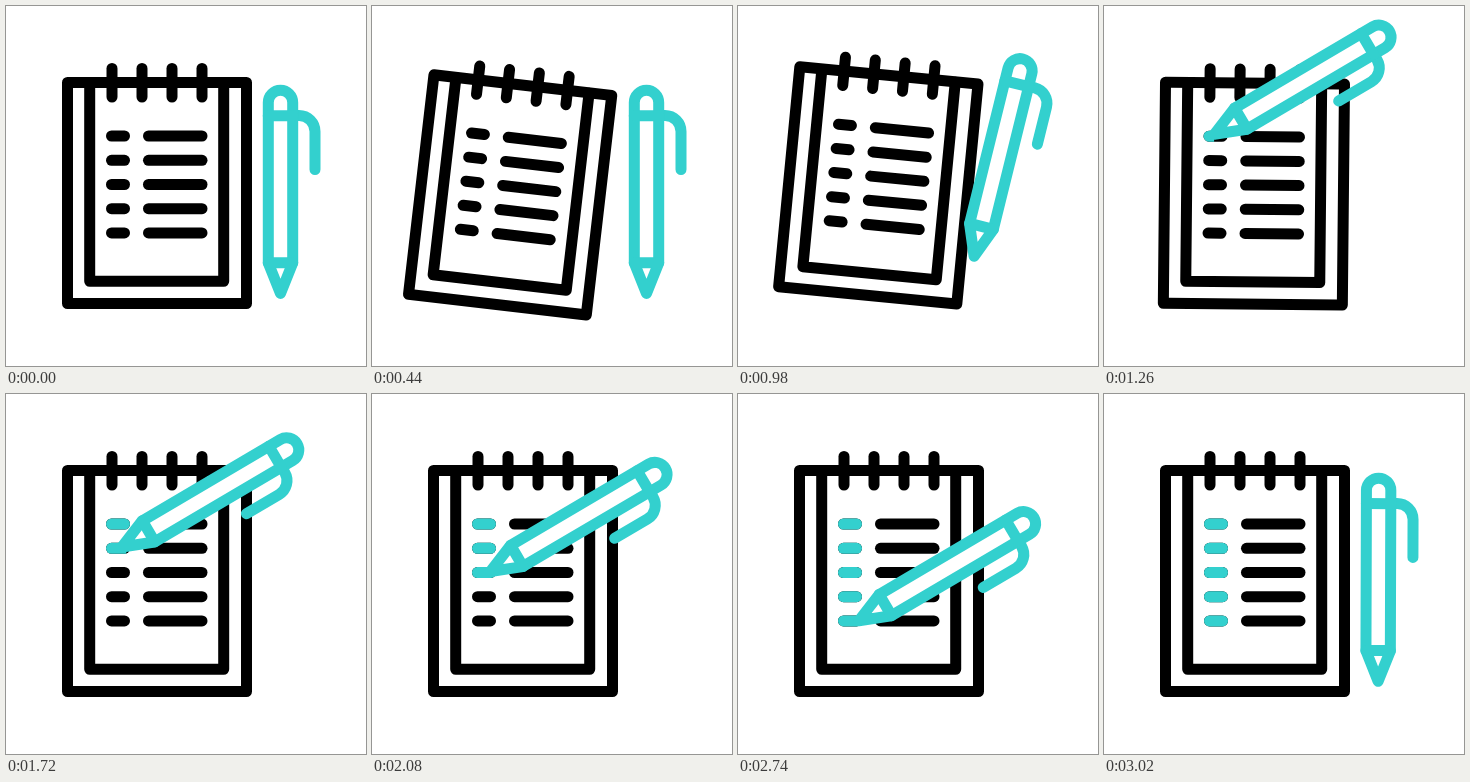
Write an HTML page with a canvas that moves like this. It is 360 by 360 pixels and loops after 3040 ms.

```html
<!DOCTYPE html>
<html lang="en">
<head>
<meta charset="utf-8">
<title>Notepad and pen</title>
<style>
  html, body { margin: 0; width: 100%; height: 100%; overflow: hidden; background: #fff; }
  canvas { display: block; width: 360px; height: 360px; }
</style>
</head>
<body>
<canvas id="stage" width="360" height="360"></canvas>
<script>
const ctx = document.getElementById('stage').getContext('2d');
const LOOP = 3040;
const TEAL = '#33d0ce';
const ROWS = [130, 154.3, 178.5, 202.7, 226.9];
const RINGS = [106, 136, 166, 196];

// Pad poses: time, tilt in degrees, vertical shift
const LOW = [7.3, 4.8], HIGH = [5.5, -10];
const PAD = [[0, 0, 0], [190, ...LOW]];
for (let i = 0; i < 6; i++) PAD.push([349 + i * 159, ...(i % 2 ? LOW : HIGH)]);
PAD.push([1285, 0, 0]);

// Pen timing and places of its tip
const REST = { x: 274.5, y: 288, a: 0 };
const TILT = 59.5;
const REACH = 858, WRITE = 1250, ROW_TIME = 310, STROKE = 250;
const LEAVE = WRITE + 4 * ROW_TIME + STROKE, HOME = 3030;

const clamp = v => Math.max(0, Math.min(1, v));
const ease = u => u * u * (3 - 2 * u);
const mix = (a, b, u) => a + (b - a) * u;
const part = (t, from, to) => clamp((t - from) / (to - from));
const mixPose = (p, q, u) => ({ x: mix(p.x, q.x, u), y: mix(p.y, q.y, u), a: mix(p.a, q.a, u) });

function padPose(t) {
  for (let i = 1; i < PAD.length; i++) {
    const [t0, a0, y0] = PAD[i - 1], [t1, a1, y1] = PAD[i];
    if (t < t1) {
      const u = ease(part(t, t0, t1));
      return { a: mix(a0, a1, u), y: mix(y0, y1, u) };
    }
  }
  return { a: 0, y: 0 };
}

const strokeProgress = (t, row) => {
  const start = WRITE + row * ROW_TIME;
  return part(t, start, start + STROKE);
};

function rowPose(row, u) {
  return { x: 109.5 + row * 0.6 + 8.5 * u, y: ROWS[row] - 1.5 + row * 0.4, a: TILT };
}

function penPose(t) {
  if (t < WRITE) return mixPose(REST, rowPose(0, 0), ease(part(t, REACH, WRITE)));
  if (t >= LEAVE) return mixPose(rowPose(4, 1), REST, ease(part(t, LEAVE, HOME)));
  const row = Math.floor((t - WRITE) / ROW_TIME);
  const start = WRITE + row * ROW_TIME;
  if (t < start + STROKE) return rowPose(row, strokeProgress(t, row));
  return mixPose(rowPose(row, 1), rowPose(row + 1, 0), part(t, start + STROKE, start + ROW_TIME));
}

function line(x1, y1, x2, y2) {
  ctx.beginPath();
  ctx.moveTo(x1, y1);
  ctx.lineTo(x2, y2);
  ctx.stroke();
}

function place(px, py, x, y, deg) {
  ctx.translate(x, y);
  ctx.rotate(deg * Math.PI / 180);
  ctx.translate(-px, -py);
}

function drawPad(t) {
  const pose = padPose(t);
  ctx.save();
  place(121, 77, 121, 77 + pose.y, pose.a);
  ctx.strokeStyle = '#000';
  ctx.strokeRect(61.5, 76.5, 179, 221);
  ctx.beginPath();
  ctx.moveTo(83.7, 77);
  ctx.lineTo(83.7, 275.3);
  ctx.lineTo(217.7, 275.3);
  ctx.lineTo(217.7, 77);
  ctx.stroke();
  for (const x of RINGS) line(x, 62.5, x, 91);
  ROWS.forEach((y, i) => {
    line(142.5, y, 196, y);
    line(105.5, y, 118.5, y);
    const done = strokeProgress(t, i);
    if (!done) return;
    ctx.save();
    ctx.beginPath();
    ctx.rect(98, y - 8, mix(12, 28, done), 16);
    ctx.clip();
    ctx.strokeStyle = TEAL;
    line(105.5, y, 118.5, y);
    ctx.restore();
  });
  ctx.restore();
}

function drawPen(t) {
  const pose = penPose(t);
  ctx.save();
  place(REST.x, REST.y, pose.x, pose.y, pose.a);
  ctx.strokeStyle = TEAL;
  ctx.fillStyle = '#fff';
  // clip
  ctx.beginPath();
  ctx.moveTo(287, 109.5);
  ctx.lineTo(293, 109.5);
  ctx.arcTo(309, 109.5, 309, 126, 16);
  ctx.lineTo(309, 163.5);
  ctx.stroke();
  // cap, barrel and nib
  ctx.beginPath();
  ctx.moveTo(274.5, 287.5);
  ctx.lineTo(262.3, 257);
  ctx.lineTo(262.3, 96.5);
  ctx.arc(274.5, 96.5, 12.2, Math.PI, 0);
  ctx.lineTo(286.7, 257);
  ctx.closePath();
  ctx.fill();
  ctx.stroke();
  line(262.3, 109.8, 286.7, 109.8);
  line(262.3, 256.7, 286.7, 256.7);
  ctx.restore();
}

function frame(now) {
  const t = now % LOOP;
  ctx.fillStyle = '#fff';
  ctx.fillRect(0, 0, 360, 360);
  ctx.lineWidth = 11;
  ctx.lineCap = ctx.lineJoin = 'round';
  drawPad(t);
  drawPen(t);
}

const begin = performance.now();
function tick() {
  frame(performance.now() - begin);
  requestAnimationFrame(tick);
}
tick();
</script>
</body>
</html>
```
